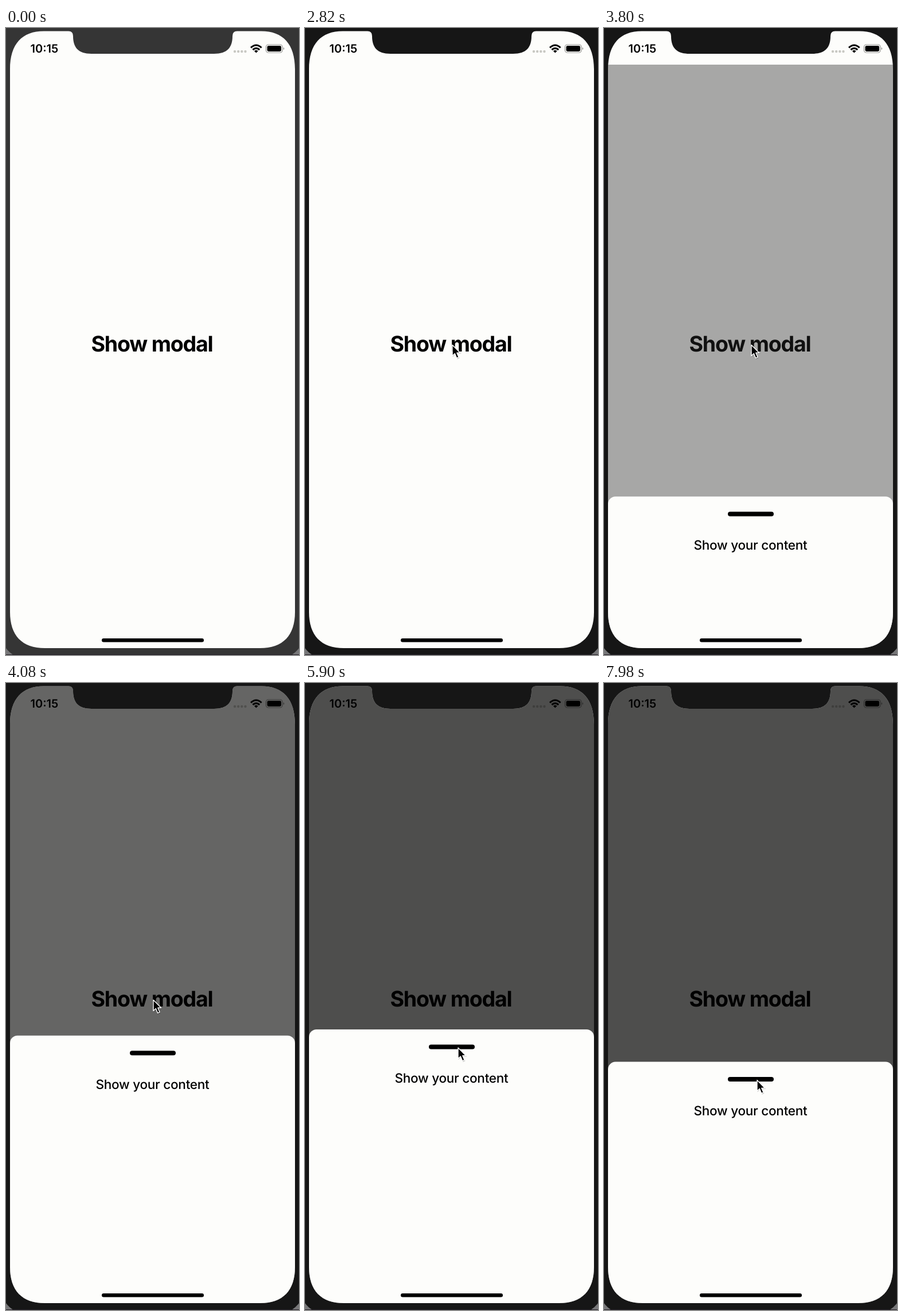
An HTML page for the animation above (8 s loop, 511 px wide and 1095 px high).

```html
<!DOCTYPE html>
<html lang="en">
<head>
<meta charset="utf-8">
<title>Show modal</title>
<style>
  html, body { margin: 0; width: 100%; height: 100%; overflow: hidden; background: #161616; }
  svg { display: block; width: 511px; height: 1095px; }
  text { font-family: Inter, "Liberation Sans", sans-serif; text-rendering: geometricPrecision; }
</style>
</head>
<body>
<svg viewBox="0 0 511 1095">
  <defs>
    <clipPath id="screen">
      <path d="M7 72C7 28 28 5.500 66 5.500H109Q117 5.500 117 14C117 34 126 45 149 45H363C386 45 395 34 395 14Q395 5.500 403 5.500H445C483 5.500 504 28 504 72V1020C504 1061 483 1083 443 1083H68C28 1083 7 1061 7 1020Z"/>
    </clipPath>
  </defs>

  <rect width="511" height="1095" fill="#777779"/>
  <path id="bezel" d="M0 0H511V1083Q506 1090 498 1095H13Q5 1090 0 1083Z"/>
  <path d="M0 1094.500H511" stroke="#252028"/>

  <g clip-path="url(#screen)">
    <rect width="511" height="1095" fill="#fdfdfb"/>
    <text id="button" x="254.500" y="565" font-size="37.500" font-weight="700" letter-spacing="-1.200" text-anchor="middle">Show modal</text>

    <text x="42.500" y="43" font-size="20" font-weight="600">10:15</text>
    <path d="M399 41h18.500" stroke="#c8c8c3" stroke-width="4.400" stroke-linecap="round" stroke-dasharray="0 6.150"/>
    <g fill="none" stroke="#000" stroke-width="3">
      <path d="M427 34.300Q436.300 25.600 445.600 34.300"/>
      <path d="M430.400 38Q436.300 32.800 442.200 38"/>
    </g>
    <path d="M433 40.200Q436.300 37.400 439.600 40.200L436.300 43.500Z"/>
    <rect x="453.500" y="29" width="28.500" height="14" rx="4" fill="none" stroke="#92928f" stroke-width="1.200"/>
    <rect x="455.500" y="31" width="24.500" height="10" rx="2.400"/>
    <path d="M483.700 33.800Q487 36 483.700 38.200Z" fill="#92928f"/>

    <rect id="backdrop" width="511" height="1095"/>
    <g id="sheet">
      <rect x="7" width="497" height="600" rx="13" fill="#fdfdfb"/>
      <rect x="216" y="26.500" width="80" height="8" rx="4"/>
      <text x="255.500" y="93" font-size="22.500" font-weight="500" letter-spacing="-.25" text-anchor="middle">Show your content</text>
    </g>
    <rect x="167" y="1066" width="178" height="6.500" rx="3.250"/>
  </g>

  <g id="cursor">
    <path d="M1 3V22L5.500 18L9 26L13 24.300L9.500 16.500H16Z" opacity=".18"/>
    <path d="M.5 1V20L4.800 16L8 23.800L11.500 22.300L8.300 14.800H14Z" stroke="#fff" stroke-width="1.400" stroke-linejoin="round"/>
  </g>
</svg>

<script>
const LOOP = 8000;
const FOCUS_AT = 2500;       // window becomes active
const COVER_STATUS_AT = 4060; // backdrop reaches under the status bar
const $ = id => document.getElementById(id);
const bezel = $('bezel'), button = $('button'), backdrop = $('backdrop');
const sheet = $('sheet'), cursor = $('cursor');

// Smooth, non-overshooting curve through [time, value] keys.
function track(...keys) {
  const slope = i => (keys[i + 1][1] - keys[i][1]) / (keys[i + 1][0] - keys[i][0]);
  const tangent = i => {
    if (i === 0 || i === keys.length - 1) return 0;
    const a = slope(i - 1), b = slope(i);
    return a * b > 0 ? 2 * a * b / (a + b) : 0;
  };
  return t => {
    if (t <= keys[0][0]) return keys[0][1];
    const i = keys.findIndex(k => k[0] > t) - 1;
    if (i < 0) return keys[keys.length - 1][1];
    const [t0, v0] = keys[i], [t1, v1] = keys[i + 1];
    const d = t1 - t0, u = (t - t0) / d, w = 1 - u;
    return v0 * (1 + 2 * u) * w * w + v1 * u * u * (3 - 2 * u)
      + d * u * w * (tangent(i) * w - tangent(i + 1) * u);
  };
}

const labelOpacity = track([3240, 1], [3360, .2], [3480, .2], [3640, .64], [3800, .9], [3940, 1]);
const dim = track([3400, 0], [3640, .13], [3800, .34], [4080, .6], [4320, .69]);
const openY = track([3370, 1090], [3500, 1051], [3640, 957], [3800, 819], [3940, 703], [4080, 616], [4170, 605]);
const drag = track([7400, 0], [7700, 22], [7980, 56.5], [8060, 62]);
const cursorX = track([900, 420], [1560, 290], [1700, 285], [2350, 256.5], [4880, 256.5], [5600, 266.5]);
const cursorY = track([900, 1110], [1560, 640], [1700, 622], [2350, 552.5], [4880, 552.5], [5600, 636]);

function draw(t) {
  bezel.setAttribute('fill', t < FOCUS_AT ? '#353535' : '#161616');
  button.setAttribute('opacity', labelOpacity(t));
  backdrop.setAttribute('opacity', dim(t));
  backdrop.setAttribute('y', t < COVER_STATUS_AT ? 64 : 0);
  sheet.setAttribute('transform', `translate(0 ${openY(t) + drag(t)})`);
  cursor.setAttribute('transform', `translate(${cursorX(t)} ${cursorY(t) + drag(t)})`);
}

function tick() {
  draw(performance.now() % LOOP);
  requestAnimationFrame(tick);
}
tick();
</script>
</body>
</html>
```
